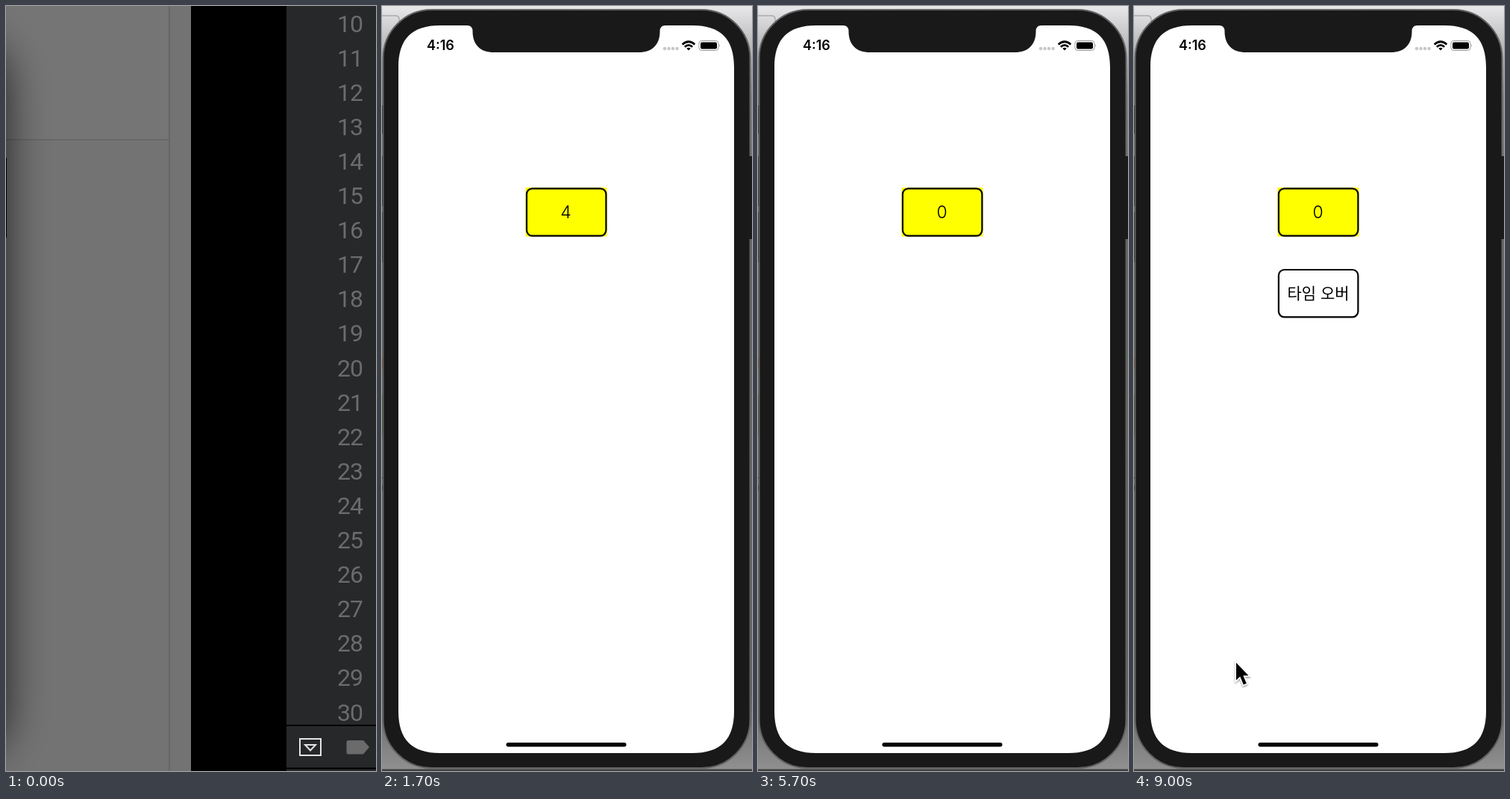
Recreate the animation shown at these times as an HTML page. Size 496x1024 px, loop 9.1 s.

```html
<!DOCTYPE html>
<html lang="ko">
<head>
<meta charset="utf-8">
<title>Countdown</title>
<style>
  html, body { margin: 0; width: 100%; height: 100%; overflow: hidden; background: #000; }
  svg { display: block; width: 496px; height: 1024px; }
  .lines { font: 32px Roboto, sans-serif; letter-spacing: -1px; fill: #6b6b6c; text-anchor: end; }
  .clock { font: 600 18px Inter, sans-serif; }
  .label { font: 300 23px Inter, sans-serif; text-anchor: middle; }
  .korean { font: 300 21px "Noto Sans CJK KR", "Noto Sans CJK", sans-serif; }
  .outline { fill: none; stroke: #000; stroke-width: 2.2; }
</style>
</head>
<body>
<svg viewBox="0 0 496 1024">
  <defs>
    <filter id="blur" x="-100%" y="-20%" width="300%" height="140%"><feGaussianBlur stdDeviation="28"/></filter>
    <filter id="drop" x="-50%" y="-50%" width="200%" height="200%">
      <feDropShadow dx="0" dy="1.5" stdDeviation="1.3" flood-opacity=".45"/>
    </filter>
    <linearGradient id="desk" x2="0" y2="1">
      <stop offset="0" stop-color="#e8e8eb"/><stop offset=".04" stop-color="#c4c4c6"/>
      <stop offset=".12" stop-color="#858585"/><stop offset=".3" stop-color="#686868"/>
      <stop offset=".9" stop-color="#626262"/><stop offset="1" stop-color="#919191"/>
    </linearGradient>
  </defs>

  <g id="editor">
    <path fill="#737373" d="M0 0H248V1024H0z"/>
    <path fill="#757575" d="M0 0H218V179H0z"/>
    <path fill="none" stroke="#646464" stroke-width="1.6" d="M0 179H219M219 0V1024"/>
    <rect x="-240" y="45" width="240" height="960" rx="60" opacity=".72" filter="url(#blur)"/>
    <path d="M0 203H1V310H0z"/>
    <path d="M248 0H376V1024H248z"/>
    <path fill="#272829" d="M376 0H496V1024H376z"/>
    <g id="lines" class="lines"></g>
    <path d="M376 962H496V964H376zM376 1019.5H496V1021.5H376z"/>
    <path fill="none" stroke="#e4e4e4" stroke-width="2" d="M394 981H422V1003H394zM401 989H415L408 996.5z"/>
    <path fill="#6b6b6c" d="M459 983H479L487 992L479 1001.500H459Q456.500 1001.500 456.500 999V985.500Q456.500 983 459 983z"/>
  </g>

  <g id="phone">
    <path fill="url(#desk)" d="M0 0H496V1024H0z"/>
    <path fill="none" stroke="#aaabad" stroke-width="1.5" d="M0 13H18Q23 13 23 18V40"/>
    <path fill="#704017" d="M0 471H3V486H0z"/>
    <path fill="#24522f" d="M0 520H3V575H0z"/>
    <path fill="#222" d="M0 630H3V633H0zM0 641H3V648H0z"/>
    <path fill="#404042" d="M0 1021.500H496V1024H0z"/>
    <path fill="#1a1a1a" d="M0 133H3V171H0zM0 201H3V268H0zM0 276H3V343H0zM490 201H496V312H490z"/>
    <rect x="1.500" y="5" width="492" height="1015" rx="65" fill="#191919" stroke="#626262" stroke-width="2"/>
    <path fill="#1a1a1a" d="M490.500 201H496V312H490.500z"/>
    <path fill="#fff" d="M78 26H114Q121.500 26 121.500 34C121.500 52 132 62 150 62H344C362 62 372.500 52 372.500 34Q372.500 26 380 26H416C454 26 472 44 472 82V944C472 982 454 1000 416 1000H78C40 1000 22 982 22 944V82C22 44 40 26 78 26z"/>
    <text class="clock" x="60" y="59">4:16</text>
    <path stroke="#c7c7c7" stroke-width="4.400" stroke-linecap="round" stroke-dasharray="0 5.500" d="M379 57H396"/>
    <g fill="none" stroke="#000" stroke-width="2.700">
      <path d="M402.700 51.500Q411 44 419.300 51.500M405.800 54.700Q411 50 416.200 54.700"/>
      <path d="M411 59.500L408.300 56.800Q411 54.600 413.700 56.800z" fill="#000" stroke="none"/>
    </g>
    <rect x="425" y="46.500" width="26" height="13" rx="3.600" fill="none" stroke="#999"/>
    <rect x="427" y="48.500" width="22" height="9" rx="2"/>
    <path fill="#999" d="M452.300 51Q454 53 452.300 55z"/>
    <rect x="166.500" y="986" width="161" height="5.500" rx="2.700"/>

    <g id="counter">
      <path fill="#ff0" d="M192.500 243H301.500V308.500H192.500z"/>
      <rect class="outline" x="193.900" y="244.300" width="106.500" height="63.300"/>
      <text id="digit" class="label" x="246.500" y="284.300"></text>
    </g>
    <g id="over">
      <rect class="outline" x="193.900" y="353" width="106.500" height="63.300"/>
      <text class="label korean" x="247" y="392">타임 오버</text>
    </g>
    <g id="cursor" filter="url(#drop)">
      <path d="M1 2V25.500L6.200 20.600L10.800 31.500L14.800 29.800L10.300 19.200H17.500z" stroke="#fff" stroke-width="3" paint-order="stroke"/>
    </g>
  </g>
</svg>
<script>
  const $ = id => document.getElementById(id);
  const LOOP = 9100, STEP = 100;

  // [time, x, y]; an entry without a place hides the pointer
  const pointer = [
    [0], [800, 321, 604], [900, 321, 591], [1300],
    [4700, 54, 530], [4900],
    [7600, 478, 772], [7700, 418, 800], [7800, 330, 812], [7900, 244, 825],
    [8100, 193, 933], [8200],
    [8500, 168, 962], [8600, 110, 965], [8700, 56, 960], [8900, 94, 921], [9000, 136, 877]
  ];

  for (let n = 10; n <= 30; n++)
    $('lines').innerHTML += `<text x="478" y="${34.5 + (n - 10) * 46.1}">${n}</text>`;

  const show = (el, on) => el.style.display = on ? '' : 'none';

  // Opacity and corner radius ease in together
  function reveal(el, t, start, length) {
    const x = Math.min(1, Math.max(0, (t - start) / length));
    const k = x * x * (3 - 2 * x);
    el.style.opacity = k;
    el.querySelector('rect').setAttribute('rx', 7.5 * k);
  }

  function draw(now) {
    const t = Math.floor(now % LOOP / STEP) * STEP;
    show($('editor'), t < 100);
    show($('phone'), t >= 100);
    reveal($('counter'), t, 600, 400);
    reveal($('over'), t, 6700, 850);
    $('digit').textContent = Math.min(5, Math.max(0, 5 - Math.floor((t - 700) / 1000)));

    const [, x, y] = pointer.filter(p => p[0] <= t).pop();
    show($('cursor'), x !== undefined);
    if (x !== undefined) $('cursor').setAttribute('transform', `translate(${x} ${y})`);
  }

  let start;
  function tick(now) {
    start ??= now;
    draw(now - start);
    requestAnimationFrame(tick);
  }
  draw(0);
  requestAnimationFrame(tick);
</script>
</body>
</html>
```
